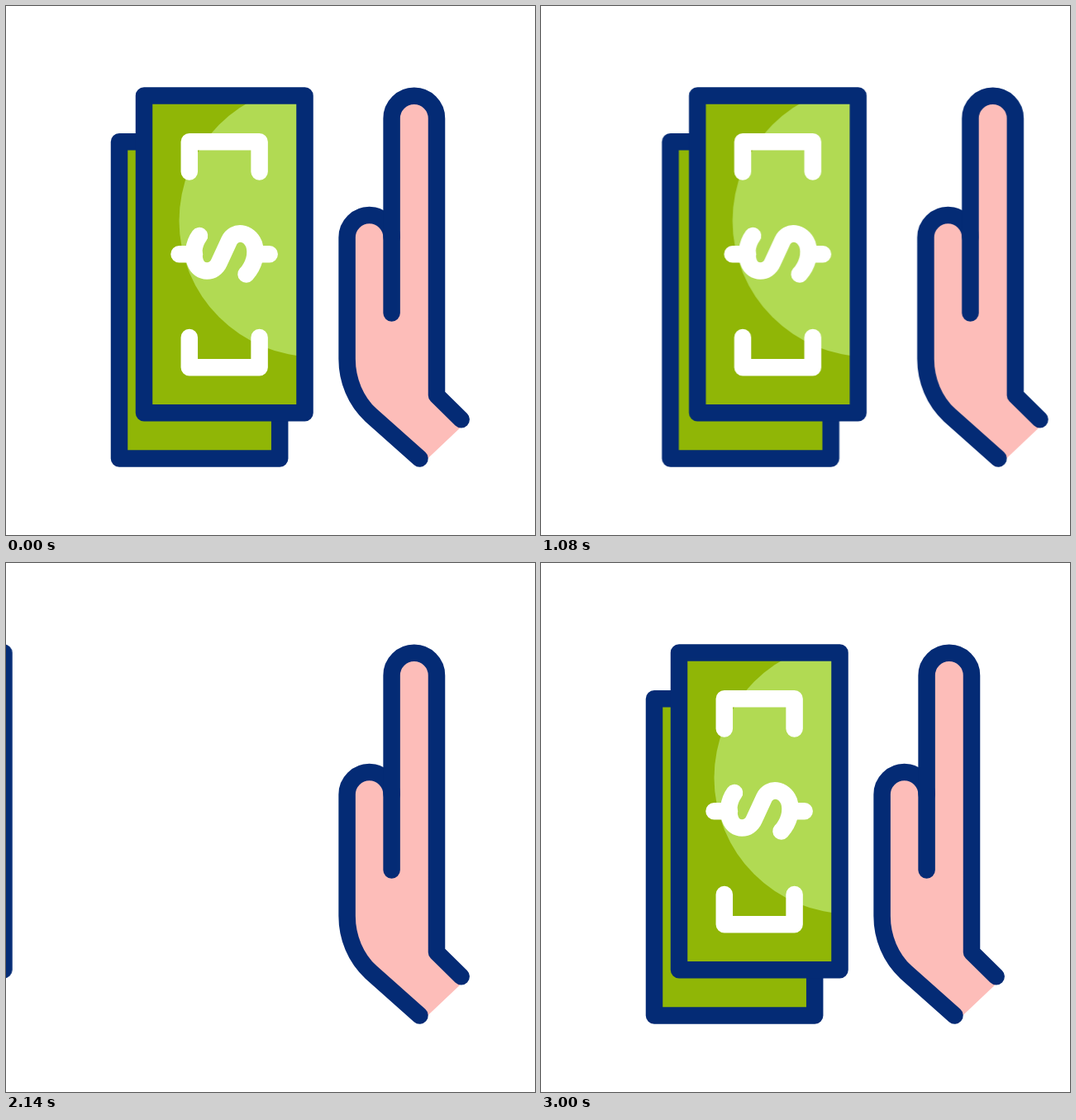
Write an HTML page without scripts that moves like this. It is 640 by 640 pixels and loops after 3.2 s.

```html
<!DOCTYPE html>
<html lang="en">
<head>
<meta charset="utf-8">
<title>Cash swipe</title>
<style>
  html, body { margin: 0; width: 100%; height: 100%; overflow: hidden; background: #fff; }
  svg { display: block; width: 100vw; height: 100vh; }

  .line { fill: none; stroke: #042b75; }
  .line, .mark { stroke-width: 20.5; stroke-linecap: round; stroke-linejoin: round; }
  .mark { fill: none; stroke: #fff; }
  .green { fill: #90b606; }
  .shine { fill: #b1da53; }
  .skin { fill: #fdbdb9; }

  .front, .back, .hand { animation: 3200ms cubic-bezier(.333, 0, .667, 1) infinite; }
  .front { animation-name: front; }
  .back { animation-name: back; }
  .hand { animation-name: hand; }

  /* wind up, fly out to the left, slide back in */
  @keyframes front {
    0%, 6.25% { transform: translateX(0); }
    30%, 37.19% { transform: translateX(22.2px); }
    53.22%, 63.44% { transform: translateX(-390px); }
    85.56%, 100% { transform: translateX(0); }
  }
  @keyframes back {
    0%, 6.25% { transform: translateX(0); }
    30%, 41.25% { transform: translateX(19.5px); }
    53.81%, 74.78% { transform: translateX(-360px); }
    93.91%, 100% { transform: translateX(0); }
  }
  @keyframes hand {
    0%, 6.25% { transform: translateX(0); }
    30% { transform: translateX(64px); }
    44.19%, 100% { transform: translateX(0); }
  }
</style>
</head>
<body>
<svg viewBox="0 0 640 640">
  <clipPath id="face"><rect x="167" y="108.5" width="194.5" height="383.7"/></clipPath>

  <g class="back">
    <rect class="line green" style="fill:#90b606" x="137" y="164.2" width="194.2" height="383.3"/>
  </g>

  <g class="front">
    <rect class="green" x="167" y="108.5" width="194.5" height="383.7"/>
    <circle class="shine" cx="374" cy="260" r="164.5" clip-path="url(#face)"/>
    <rect class="line" x="167" y="108.5" width="194.5" height="383.7"/>
    <g class="mark">
      <path d="M221.8 200.5V164.2H306.6V200.5"/>
      <path d="M221.8 401V437.3H306.6V401"/>
      <path d="M209.5 300.2H228M302 300.2H318.7"/>
      <path d="M234 278C226 289 226 302 229 310C234 324 252 324 258 310L270 284C276 271 294 273 300 288C304 300 300 314 290.5 324.5"/>
    </g>
  </g>

  <g class="hand">
    <path class="skin" d="M466.6 280V136A27.2 27.2 0 0 1 521 136V471L554 504V506L506.5 551L500.5 547.5L441.5 495C423 478 412.6 453 412.6 427V280A27 27 0 0 1 466.6 280Z"/>
    <path class="line" d="M500.5 547.5L441.5 495C423 478 412.6 453 412.6 427V280A27 27 0 0 1 466.6 280"/>
    <path class="line" d="M466.6 371.5V136A27.2 27.2 0 0 1 521 136V471L550.7 500.2"/>
  </g>
</svg>
</body>
</html>
```
